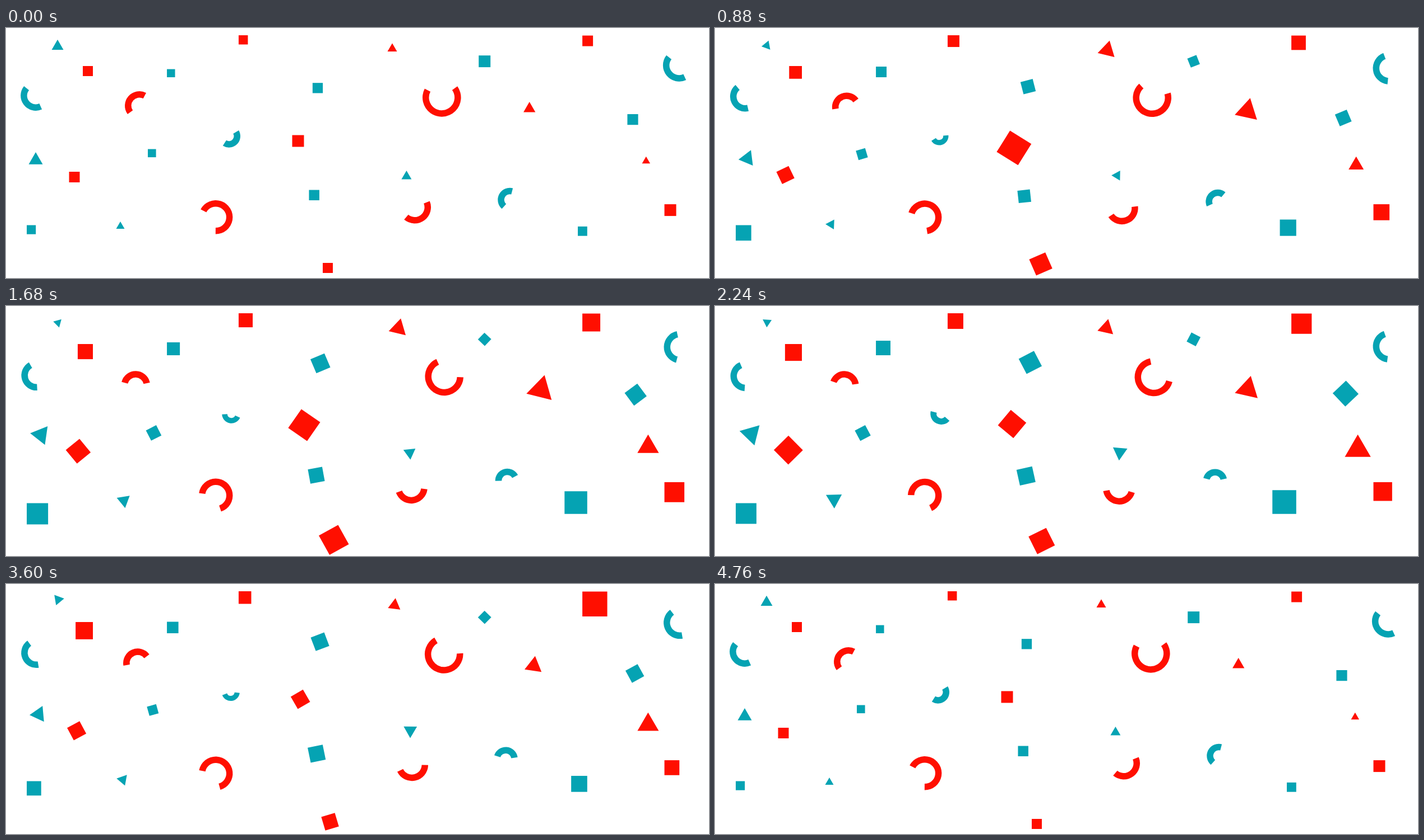
Recreate the animation shown at these times as an HTML page. Size 1254 px wide and 447 px high, loop 4.8 s.

```html
<!DOCTYPE html>
<html lang="en">
<head>
<meta charset="utf-8">
<title>Confetti shapes</title>
<style>
  html, body { margin: 0; width: 100%; height: 100%; overflow: hidden; background: #fff; }
  svg { display: block; width: 100vw; height: 100vh; }
</style>
</head>
<body>
<svg id="stage" viewBox="0 0 1254 447"></svg>
<script>
const RED = '#ff0f00', TEAL = '#05a3b3';
const STEP = 40, FRAMES = 120, LAST = FRAMES - 1;
const BAND = 11.5, SHORT = 153, LONG = 243;
const SQUARE = 'M-.5-.5h1v1h-1z';
const TRIANGLE = 'M0-.5774L.5.2887h-1z';
const stage = document.getElementById('stage');
const shapes = [];

const mix = (a, b, p) => a + (b - a) * p;
const polar = (r, deg) => [r * Math.cos(deg * Math.PI / 180), r * Math.sin(deg * Math.PI / 180)];

function addPath(d, fill) {
  const el = document.createElementNS('http://www.w3.org/2000/svg', 'path');
  el.setAttribute('d', d);
  el.setAttribute('fill', fill);
  stage.append(el);
  return el;
}

// Points travel in straight lines between two scaled and turned poses.
const morph = (size, end, turn) => {
  const [u, v] = polar(end, turn);
  return p => [mix(size, u, p), v * p];
};
const spin = turn => p => polar(1, turn * p);

// A square grows away from its pinned corner, then turns about its middle.
function square(fill, x, y, size, end, peak, pin, turn = 0) {
  const grow = (end - size) / 2;
  const dx = pin.includes('W') ? grow : -grow;
  const dy = pin.includes('N') ? grow : -grow;
  shapes.push({ el: addPath(SQUARE, fill), x, y, dx, dy, peak, axis: morph(size, end, turn) });
}

function triangle(fill, x, y, size, end, peak, dx, dy, turn = 0) {
  shapes.push({ el: addPath(TRIANGLE, fill), x, y, dx, dy, peak, axis: morph(size, end, turn) });
}

// A ring segment placed, and turned, by the middle of its bounding box.
function arc(fill, x, y, r, start, sweep, turn, peak, { dx = 0, dy = 0, axis = spin(turn) } = {}) {
  const inner = r - BAND, end = start + sweep, large = +(sweep > 180);
  const el = addPath(
    `M${polar(r, start)}A${r} ${r} 0 ${large} 1 ${polar(r, end)}` +
    `L${polar(inner, end)}A${inner} ${inner} 0 ${large} 0 ${polar(inner, start)}z`, fill);
  const box = el.getBBox();
  const pivot = [box.x + box.width / 2, box.y + box.height / 2];
  shapes.push({ el, x, y, dx, dy, peak, axis, pivot });
}

square(RED, 423.2, 21.2, 16.5, 28.8, 60, 'NW');
square(RED, 146, 77, 18, 35.3, 80, 'NE');
square(TEAL, 294.3, 80.8, 14.5, 26.8, 60, 'SW');
square(TEAL, 45.1, 360.6, 16.2, 40.2, 46, 'NW');
square(RED, 1037.6, 23, 19, 46.2, 88, 'NW');
square(RED, 1185, 325.6, 21, 35.9, 43, 'NW');
square(TEAL, 1028.4, 363.3, 16.8, 45, 50, 'SE');
square(TEAL, 556, 107.3, 18.3, 33.3, 66, 'SW', -30);
square(RED, 521, 202, 21, 48, 24, 'NW', -60);
square(RED, 122, 266.5, 19, 37, 55, 'SW', -45);
square(TEAL, 260.3, 223.8, 14.6, 21.9, 49, 'NW', -30);
square(TEAL, 549.7, 298.8, 18.5, 32.1, 75, 'NW', -15);
square(RED, 574, 429, 18, 41.2, 36, 'SW', -30);
square(TEAL, 853.7, 59.6, 21, 21, 70, 'NW', -75);
square(TEAL, 1118, 163.6, 19.2, 34, 60, 'SW', -45);

triangle(TEAL, 92, 32.9, 21, 21.7, 85, 1.3, -5.9, 90);
triangle(TEAL, 53, 236.5, 25, 37.7, 54, 11.9, -8.1, 45);
triangle(TEAL, 204, 354.6, 15, 29.8, 60, 8.9, -9.7, 60);
triangle(RED, 689, 37, 17, 34.1, 27, 13.1, 3.4, 15);
triangle(RED, 933.7, 144.4, 21.3, 49.7, 32, 23, 5.6, 15);
triangle(TEAL, 714.4, 265.4, 18, 32.5, 75, 10.3, -5.4, 75);
triangle(RED, 1141.8, 238, 14.5, 54.2, 70, 6, 23);

arc(TEAL, 45.1, 125.9, 27, 66, SHORT, 30, 60);
arc(RED, 231, 133.5, 26, 144.5, SHORT, 60, 50);
arc(RED, 375.8, 338.3, 30.3, 207.5, LONG, -30, 66);
arc(RED, 777.3, 131.5, 34.3, -35.6, LONG, 60, 66);
arc(TEAL, 890.7, 304.5, 21.5, 131.5, SHORT, 90, 80);
arc(TEAL, 1192.5, 72.3, 29, 65, SHORT, 45, 32);
arc(RED, 734.1, 329.5, 29, -22.5, SHORT, 45, 64, { dx: -17, dy: 7.5 });
arc(TEAL, 402.4, 198.4, 20.3, -30.5, SHORT, 75, 60, { dx: -2, axis: morph(1, 1, 75) });

function render(frame) {
  for (const { el, x, y, dx, dy, peak, axis, pivot: [px, py] = [0, 0] } of shapes) {
    const p = frame < peak ? frame / peak : (LAST - frame) / (LAST - peak);
    const [a, b] = axis(p);
    const left = x + dx * p - (a * px - b * py);
    const top = y + dy * p - (b * px + a * py);
    const matrix = [a, b, -b, a, left, top].map(n => n.toFixed(4));
    el.setAttribute('transform', `matrix(${matrix})`);
  }
}

let startTime;
function tick(now) {
  startTime ??= now;
  render(Math.floor(Math.max(0, now - startTime) / STEP) % FRAMES);
  requestAnimationFrame(tick);
}
render(0);
requestAnimationFrame(tick);
</script>
</body>
</html>
```
